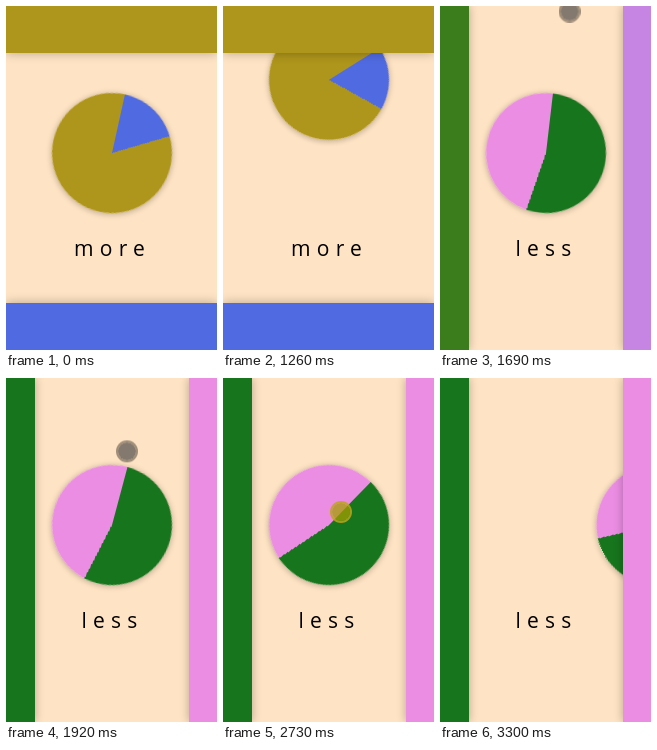
Recreate the animation shown at these times as an HTML page. Size 211 by 344 pixels, loop 3.35 s.

```html
<!DOCTYPE html>
<html lang="en">
<head>
<meta charset="utf-8">
<title>More or less</title>
<style>
:root {
  --loop: 3350ms;
  --olive: #ae951b;
  --blue: #506be1;
  --green: #17751d;
  --pink: #eb8de3;
}
html, body { margin: 0; width: 100%; height: 100%; overflow: hidden; }
body { position: relative; background: #fee3c4; }

.scene, .pie, .disc, .bar, .word, .dot { position: absolute; }
.scene { inset: 0; overflow: hidden; }
.scene, .scene *, .dot { animation: var(--loop) linear infinite; }

/* Scenes swap at 1505 ms */
.more { animation-name: show-first; }
.less { animation-name: show-second; }
@keyframes show-first {
  0%, 44.92% { visibility: visible; }
  44.93%, 100% { visibility: hidden; }
}
@keyframes show-second {
  0%, 44.92% { visibility: hidden; }
  44.93%, 100% { visibility: visible; }
}

.word {
  left: 1px; width: 211px; top: 227px;
  font: 500 21px/30px "Open Sans", "Noto Sans", sans-serif;
  letter-spacing: 6.2px;
  text-align: center;
  color: #000;
}

.pie {
  left: 46px; top: 87px; width: 120px; height: 120px;
  border-radius: 50%;
  box-shadow: 0 1px 6px rgba(0, 0, 0, .28);
}
.disc { inset: 0; border-radius: 50%; }
.more .disc {
  background: conic-gradient(var(--blue) 61.2deg, var(--olive) 0);
  animation-name: spin-first;
}
.less .disc {
  background: conic-gradient(var(--green) 192.4deg, var(--pink) 0);
  animation-name: spin-second;
}
/* Both turn at 36 degrees per second */
@keyframes spin-first { from { transform: rotate(12.4deg); } to { transform: rotate(133deg); } }
@keyframes spin-second { from { transform: rotate(-54.2deg); } to { transform: rotate(66.4deg); } }

.more .pie { animation-name: fly-up; }
.less .pie { animation-name: fly-right; }
@keyframes fly-up {
  0%, 32.98% { transform: none; animation-timing-function: ease-in-out; }
  44.92%, 100% { transform: translateY(-231px); }
}
@keyframes fly-right {
  0%, 92.72% { transform: none; animation-timing-function: ease-in; }
  100% { transform: translateX(160px); }
}

.bar { box-shadow: 0 0 10px rgba(0, 0, 0, .28); }
.more .bar { left: 0; width: 100%; height: 47px; }
.less .bar { top: 0; height: 100%; }
.top { top: 0; background: var(--olive); }
.bottom { bottom: 0; background: var(--blue); }
.left { left: 0; width: 29px; animation-name: to-green; }
.right { left: 183px; right: 0; animation-name: to-pink; }
@keyframes to-green {
  0%, 44.93% { background: var(--olive); animation-timing-function: ease; }
  56.87%, 100% { background: var(--green); }
}
@keyframes to-pink {
  0%, 44.93% { background: var(--blue); animation-timing-function: ease; }
  56.87%, 100% { background: var(--pink); }
}

.dot {
  left: -11px; top: -11px; width: 22px; height: 22px;
  box-sizing: border-box;
  border-radius: 50%;
  border: 2px solid;
  background-clip: padding-box;
  animation-name: travel, press;
}
@keyframes travel {
  0% { transform: translate(197px, 358px); }
  6.5% { transform: translate(176px, 280px); }
  11.5% { transform: translate(152px, 225px); animation-timing-function: ease-out; }
  19.1% { transform: translate(116px, 145px); }
  23.9% { transform: translate(113px, 143px); animation-timing-function: ease-in; }
  32.5% { transform: translate(111px, -14px); }
  48.5% { transform: translate(132px, -14px); }
  57.3% { transform: translate(121px, 73px); animation-timing-function: ease-out; }
  70%, 82.5% { transform: translate(118px, 134px); animation-timing-function: ease-in-out; }
  91.5% { transform: translate(168px, 136px); opacity: 1; }
  94.5%, 100% { transform: translate(171px, 136px); opacity: 0; }
}
@keyframes press {
  0%, 21.5%, 34%, 77%, 100% {
    background-color: rgba(36, 38, 45, .56);
    border-color: rgba(95, 85, 70, .6);
  }
  23%, 32.5%, 78.5%, 95% {
    background-color: rgba(165, 158, 0, .75);
    border-color: rgba(190, 165, 25, .85);
  }
}
</style>
</head>
<body>
<div class="scene more">
  <div class="word">more</div>
  <div class="pie"><div class="disc"></div></div>
  <div class="bar top"></div>
  <div class="bar bottom"></div>
</div>
<div class="scene less">
  <div class="word">less</div>
  <div class="pie"><div class="disc"></div></div>
  <div class="bar left"></div>
  <div class="bar right"></div>
</div>
<div class="dot"></div>
</body>
</html>
```
